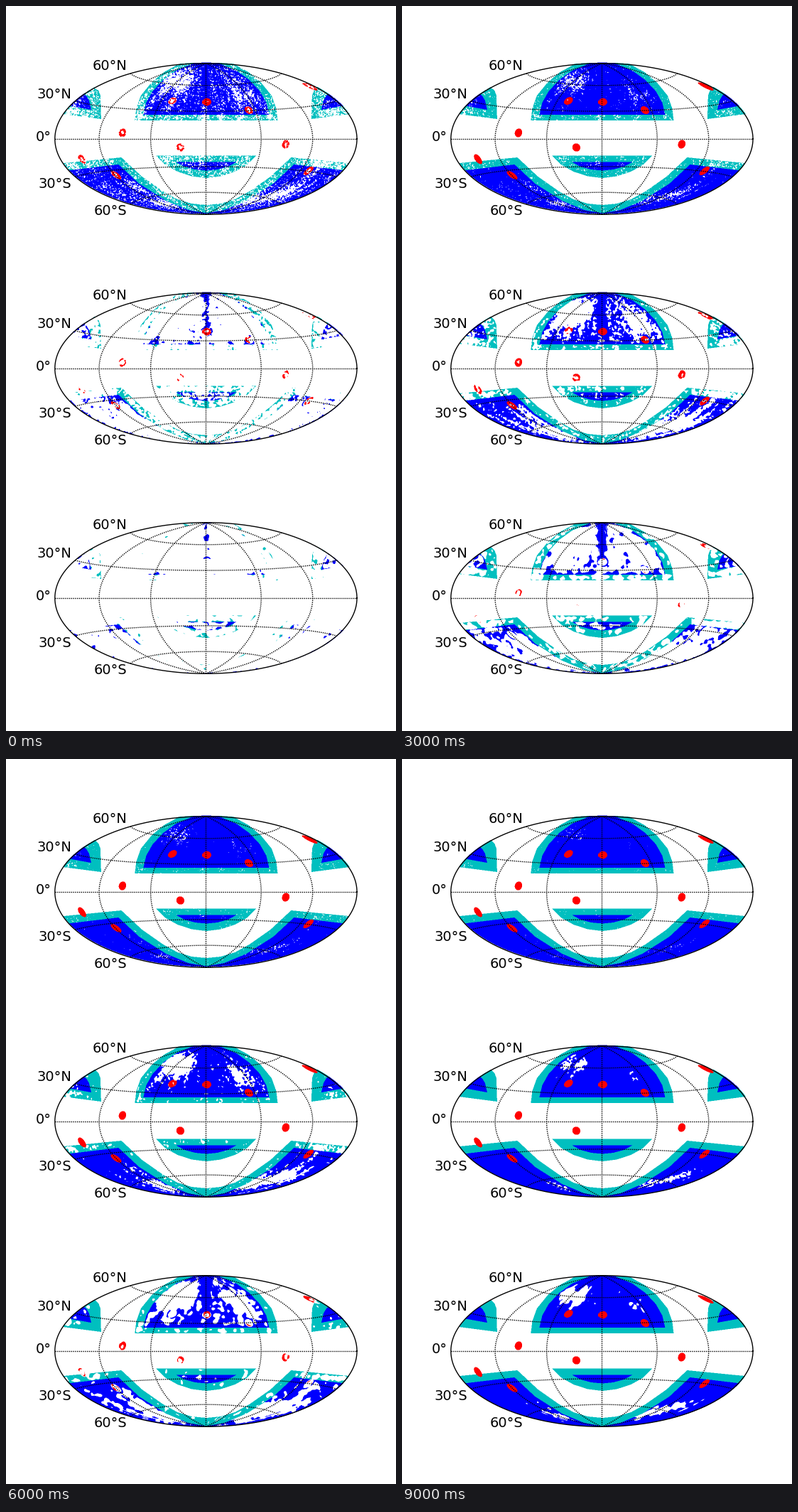
Recreate the animation shown at these times as a matplotlib script. Size 549 by 1020 pixels, loop 10000 ms.

```python
import numpy as np
import matplotlib.pyplot as plt
from matplotlib.animation import FuncAnimation

W, H, DPI = 549, 1020, 100
FRAMES, INTERVAL = 10, 1000
CX, CENTRES = 281.4, (187, 510, 833)
RX, RY = 212.6, 106.3            # half axes of each sky map
X0, WIN_W, HALF = 68, 428, 108   # pixel window that holds one map
SS = 2                           # supersampling

BLUE, CYAN, RED = (0, 0, 1), (0, 0.75, 0.75), (1, 0, 0)
rng = np.random.default_rng(12)


# ---- Hammer projection, in pixels relative to the map centre ----
def project(lon, lat):
    lon, lat = np.radians(lon) / 2, np.radians(lat)
    d = np.sqrt(1 + np.cos(lat) * np.cos(lon))
    return RX * np.cos(lat) * np.sin(lon) / d, -RY * np.sin(lat) / d


def unproject(dx, dy):
    x, y = dx / RX * 2 * np.sqrt(2), -dy / RY * np.sqrt(2)
    z = np.sqrt(np.clip(1 - (x / 4) ** 2 - (y / 2) ** 2, 0.5, 1))
    lon = 2 * np.arctan2(z * x, 2 * (2 * z * z - 1))
    return lon, np.arcsin(np.clip(z * y, -1, 1))


xs = X0 + (np.arange(WIN_W * SS) + 0.5) / SS - CX
ys = -HALF + (np.arange(2 * HALF * SS) + 0.5) / SS
DX, DY = np.meshgrid(xs, ys)
U = np.abs(DX)
LON, LAT = unproject(DX, DY)
SKY = (DX / RX) ** 2 + (DY / RY) ** 2 < 1


# ---- noise and shape helpers ----
def blur(a, sigma):
    s = sigma * SS
    fy = np.fft.fftfreq(a.shape[0])[:, None]
    fx = np.fft.fftfreq(a.shape[1])[None, :]
    kernel = np.exp(-2 * (np.pi * s) ** 2 * (fx ** 2 + fy ** 2))
    return np.fft.ifft2(np.fft.fft2(a) * kernel).real


def noise(sigma):
    n = blur(rng.standard_normal(DX.shape), sigma)
    return n / n.std()


def streaks(nlon, nlat):
    """Noise drawn out along the meridians."""
    g = rng.standard_normal((nlat + 2, nlon + 2))
    a = (LON / (2 * np.pi) + 0.5) * nlon
    b = (LAT / np.pi + 0.5) * nlat
    i, j = a.astype(int), b.astype(int)
    a, b = a - i, b - j
    n = ((g[j, i] * (1 - a) + g[j, i + 1] * a) * (1 - b)
         + (g[j + 1, i] * (1 - a) + g[j + 1, i + 1] * a) * b)
    return n / n.std()


def blob(x, y, length, width, angle=0):
    t = np.radians(angle)
    u = (DX - x) * np.cos(t) - (DY - y) * np.sin(t)
    v = (DX - x) * np.sin(t) + (DY - y) * np.cos(t)
    return np.exp(-(u / length) ** 2 - (v / width) ** 2)


# ---- survey regions ----
dome_out = (DY < -25) & (U < np.interp(
    DY, [-106, -100, -93, -79, -60, -42, -25], [36, 46, 59, 76, 91.5, 98, 100]))
dome_in = (DY < -33) & (U < np.interp(
    DY, [-105, -95, -82, -66, -50, -33], [18, 42, 60, 75, 84, 88]))
side_out = (DY < -27 - (U - 147.5) * 0.13) & (U > np.interp(
    DY, [-72, -67, -60, -27], [156, 151, 148.5, 147.5])) & (DY > -72)
side_in = (DY < -40 - (U - 161.5) * 0.18) & (U > np.interp(
    DY, [-63, -59, -53, -40], [172, 168, 164.5, 161.5])) & (DY > -63)
lens_out = (DY > 24.5) & (U < 70) & (DY < np.interp(
    U, [0, 20, 40, 57, 70], [56, 53.5, 47, 37.5, 24.5]))
lens_in = (DY > 33.5) & (U < 42) & (DY < np.interp(
    U, [0, 15, 30, 42], [45.5, 44, 40, 33.5]))
low_out = DY > np.interp(
    U, [0, 20, 40, 60, 90, 119, 200], [94, 92, 86, 75, 54, 27, 35])
low_in = DY > np.interp(
    U, [0, 25, 56, 94, 123, 190], [105.5, 101, 88, 64, 37, 45])

# small fields: position, relative to the map centre
FIELDS = [(-117.5, -7.5), (-47, -52.5), (0.5, -51), (59.5, -39.5),
          (145.5, -73), (111.5, 8.5), (-36, 13), (-174.5, 29.5),
          (-126.5, 52), (143.5, 46)]
RADIUS = np.radians(4.3)


def field_distance(x, y):
    lon, lat = unproject(x, y)
    c = (np.sin(lat) * np.sin(LAT)
         + np.cos(lat) * np.cos(LAT) * np.cos(LON - lon))
    return np.arccos(np.clip(c, -1, 1)) / RADIUS


rho = [field_distance(x, y) for x, y in FIELDS]
discs = [SKY & (r < 1) for r in rho]
free = SKY & ~np.any(discs, axis=0)

regions = [  # mask, colour
    (dome_in, BLUE), (dome_out & ~dome_in, CYAN),
    (side_in, BLUE), (side_out & ~side_in, CYAN),
    (lens_in, BLUE), (lens_out & ~lens_in, CYAN),
    (low_in & (DX < 0), BLUE), (low_in & (DX >= 0), BLUE),
    (low_out & ~low_in, CYAN)]
regions = [(m & free, c) for m, c in regions]


# ---- structure: low values are observed early, high values late ----
def edge(mask):
    return -3 * (1 - blur((mask & SKY).astype(float), 1.6))


dome = (edge(dome_in)
        - 3 * np.exp(-(DX / 5) ** 2) * (DY < -50)
        - blob(0, -103, 20, 5) - np.exp(-((DY + 35) / 3) ** 2)
        - blob(-78, -40, 8, 6) - blob(85, -42, 8, 6)
        + 4.5 * blob(-48, -81, 18, 9, 35) + 4.5 * blob(-27, -76, 17, 8, 55)
        + 1.4 * blob(-42, -68, 30, 24, 40) + 2.6 * blob(44, -67, 30, 12, -42))
low = (edge(low_in)
       - 1.5 * blob(-125, 42, 18, 6, -5) - 1.5 * blob(125, 42, 18, 6, 5)
       + 4 * blob(112, 77, 28, 8, 14) + 4 * blob(65, 88, 34, 5, 14)
       + 1.8 * blob(90, 70, 60, 18, 28)
       + 4 * blob(-56, 92, 26, 4, -14) + 1.8 * blob(-80, 80, 50, 12, -22))
for k, gain in ((1, 0.9), (2, 2.2), (3, 1.8), (8, 1.8), (9, 1.8)):
    ring = gain * np.exp(-((rho[k] - 1.15) / 0.2) ** 2)
    dome, low = dome - ring, low - ring

structure = [
    dome,
    edge(dome_out & ~dome_in) + 1.0 * (DY > -34),
    edge(side_in) + (U - 160) * 0.08,
    edge(side_out & ~side_in) + (U - 160) * 0.06,
    edge(lens_in) - 0.1 * DY,
    edge(lens_out & ~lens_in) - 0.02 * DY,
    low, low,
    edge(low_out & ~low_in) + 1.5 * (U > 125)]


def rank(values, mask):
    """Order of the masked pixels, scaled to 0..1."""
    v = values[mask]
    out = np.empty(v.size)
    out[np.argsort(v)] = np.arange(v.size) / v.size
    return out


# per map: noise size in pixels, noise, streak and structure weights
STYLES = [(0.5, 1.0, 0.5, 0.5), (1.0, 0.8, 0.7, 1.0), (1.9, 0.8, 0.6, 1.0)]
streak = 0.7 * streaks(110, 12) + 0.7 * streaks(50, 8)
order, disc_order = [], []
for size, wn, ws, wf in STYLES:
    n = noise(size)
    order.append([rank(wn * n + ws * streak + wf * s, m)
                  for s, (m, _) in zip(structure, regions)])
    disc_order.append([rank(3 * np.abs(r - 0.7) + 0.5 * n, d)
                       for r, d in zip(rho, discs)])

# ---- covered share of every region over time ----
START = [0.74, 0.65, 0.88, 0.55, 0.85, 0.65, 0.80, 0.70, 0.65]
KEYS = [0, 1, 3, 5, 9]
MIDDLE = [(.08, .28, .52, .70, .955), (.15, .50, .85, .93, 1),
          (.35, .55, .80, .95, 1), (.10, .25, .50, .85, 1),
          (.35, .55, .90, 1, 1), (.25, .50, .80, .95, 1),
          (.10, .30, .65, .85, .985), (.08, .22, .48, .62, .92),
          (.20, .40, .65, .80, 1)]
BOTTOM = [(.02, .06, .20, .38, .90), (.03, .20, .60, .82, 1),
          (.20, .30, .60, .92, 1), (.06, .20, .50, .88, 1),
          (.25, .32, .65, .88, 1), (.10, .30, .70, .92, 1),
          (.04, .08, .25, .50, .96), (.03, .07, .20, .40, .86),
          (.02, .12, .55, .75, 1)]
DISC_BASE = np.array([.4, -.05, .8, .35, .15, .35, .15, .1, .4, .35])
DISC_EARLY = np.array([.2, 0, 0, 0, .2, .04, 0, 0, 0, 0])
DISC_MID = np.array([.5, 0, .1, .05, .4, .3, .02, .08, 0, 0])
DISC_LATE = np.array([1, 0, .8, .15, .7, .8, .75, .3, .5, .1])


def region_share(panel, i, k):
    if panel == 0:
        return 1 - (1 - START[i]) * 0.62 ** k
    return np.interp(k, KEYS, (MIDDLE, BOTTOM)[panel - 1][i])


def disc_share(panel, i, k):
    if panel == 0:
        return 0.5 + 0.6 * DISC_BASE[i] + 0.17 * k
    if panel == 1:
        return DISC_BASE[i] + 0.16 * k
    return np.interp(k, [1, 2, 5, 7, 9],
                     [0, DISC_EARLY[i], DISC_MID[i], DISC_LATE[i], 1])


def render(panel, k):
    img = np.ones(DX.shape + (3,))
    layers = [(m, c, order[panel][i], region_share(panel, i, k))
              for i, (m, c) in enumerate(regions)]
    layers += [(d, RED, disc_order[panel][i], disc_share(panel, i, k))
               for i, d in enumerate(discs)]
    for mask, colour, when, share in layers:
        img[mask] = np.where((when < share)[:, None], colour, 1.0)
    return img.reshape(2 * HALF, SS, WIN_W, SS, 3).mean(axis=(1, 3))


# ---- figure ----
plt.rcParams["font.family"] = "DejaVu Sans"
# the small surplus keeps the pixel size from being rounded down
fig = plt.figure(figsize=((W + 0.01) / DPI, (H + 0.01) / DPI), dpi=DPI,
                 facecolor="white")
ax = fig.add_axes([0, 0, 1, 1])
canvas = np.ones((H, W, 3))
picture = ax.imshow(canvas, extent=(0, W, H, 0), interpolation="nearest",
                    aspect="auto", vmin=0, vmax=1)
ax.set_xlim(0, W)
ax.set_ylim(H, 0)
ax.axis("off")

LABELS = [("60°N", 170.5, -97), ("30°N", 92.5, -57.5), ("0°", 64, 3),
          ("30°S", 92.5, 68.5), ("60°S", 170.5, 107)]
lons, lats = np.linspace(-180, 180, 361), np.linspace(-90, 90, 181)
turn = np.linspace(0, 2 * np.pi, 400)
for cy in CENTRES:
    grid = [project(lons, lat) for lat in (-60, -30, 0, 30, 60)]
    grid += [project(lon, lats) for lon in (-120, -60, 0, 60, 120)]
    for gx, gy in grid:
        ax.plot(CX + gx, cy + gy, color="k", lw=1, dashes=(1, 1),
                dash_capstyle="butt")
    ax.plot(CX + RX * np.cos(turn), cy + RY * np.sin(turn), color="k", lw=1)
    for text, x, y in LABELS:
        ax.text(x, cy + y, text, fontsize=14, ha="right", va="baseline")


def update(k):
    for panel, cy in enumerate(CENTRES):
        canvas[cy - HALF:cy + HALF, X0:X0 + WIN_W] = render(panel, k)
    picture.set_data(canvas)
    return [picture]


anim = FuncAnimation(fig, update, frames=FRAMES, interval=INTERVAL,
                     repeat=True, repeat_delay=0, blit=False)
plt.show()
```
